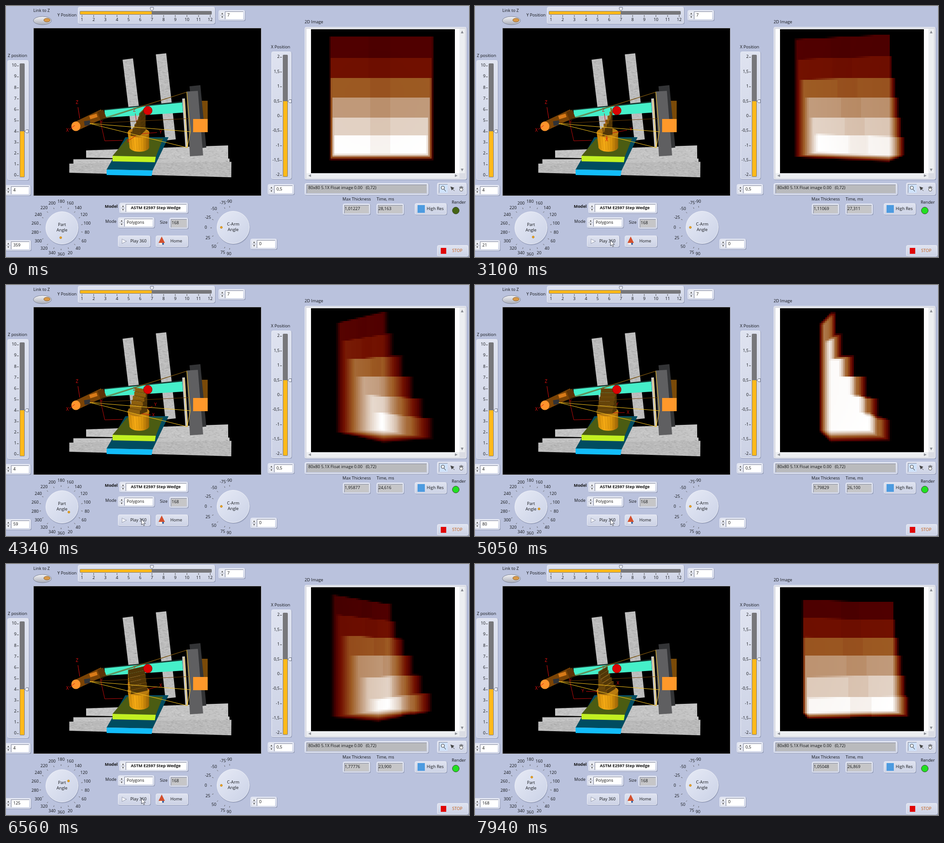
Write an HTML page with a canvas that moves like this. It is 1017 by 551 pixels and loops after 8 s.

```html
<!DOCTYPE html>
<html lang="en">
<head>
<meta charset="utf-8">
<title>X-ray stand simulator</title>
<style>
html, body { margin: 0; width: 100%; height: 100%; overflow: hidden; background: #bac2dd; }
canvas { display: block; }
</style>
</head>
<body>
<canvas id="stage" width="1017" height="551"></canvas>
<script>
const W = 1017, H = 551, LOOP = 8000;
const stage = document.getElementById('stage').getContext('2d');
let c = stage;

const sin = deg => Math.sin(deg * Math.PI / 180);
const cos = deg => Math.cos(deg * Math.PI / 180);
const comma = s => String(s).replace('.', ',');

function layer(w, h) {
  const cv = document.createElement('canvas');
  cv.width = w; cv.height = h;
  return cv.getContext('2d');
}
function seeded(s) {
  return () => (s = (s * 16807) % 2147483647) / 2147483647;
}

// ---------- drawing helpers ----------
function text(s, x, y, align = 'left', color = '#111316', style = '', size = 9.2) {
  c.font = `${style} ${size}px "Open Sans", "Noto Sans", sans-serif`;
  c.textAlign = align;
  c.textBaseline = 'middle';
  c.fillStyle = color;
  c.fillText(s, x, y);
}
function rect(x, y, w, h, color) {
  c.fillStyle = color;
  c.fillRect(x, y, w, h);
}
function trace(p) {
  c.beginPath();
  for (let i = 0; i < p.length; i += 2) c.lineTo(p[i], p[i + 1]);
}
function poly(color, ...p) {
  trace(p);
  c.fillStyle = color;
  c.fill();
}
function line(color, ...p) {
  trace(p);
  c.strokeStyle = color;
  c.lineWidth = 1;
  c.stroke();
}
function disc(x, y, rx, ry, fill, edge) {
  c.beginPath();
  c.ellipse(x, y, rx, ry, 0, 0, 7);
  c.fillStyle = fill;
  c.fill();
  if (edge) { c.strokeStyle = edge; c.lineWidth = 1; c.stroke(); }
}
function arrow(x, y, turn, size = 3, color = '#8a8d94') {
  c.save();
  c.translate(x, y);
  c.rotate(turn * Math.PI / 2);
  poly(color, 0, -size, size, size, -size, size);
  c.restore();
}
function fade(x0, y0, x1, y1, ...colors) {
  const g = c.createLinearGradient(x0, y0, x1, y1);
  colors.forEach((k, i) => g.addColorStop(i / (colors.length - 1), k));
  return g;
}
function panel(x, y, w, h, fill = fade(0, y, 0, y + h, '#dfe3f0', '#ccd2e5')) {
  c.beginPath();
  c.roundRect(x + 1, y + 1, w, h, 3);
  c.fillStyle = 'rgba(90,98,130,.45)';
  c.fill();
  c.beginPath();
  c.roundRect(x + .5, y + .5, w - 1, h - 1, 3);
  c.fillStyle = fill;
  c.fill();
  c.strokeStyle = '#eef0f8';
  c.lineWidth = 1;
  c.stroke();
}
function field(x, y, w, h, fill = '#fff') {
  rect(x, y, w, h, '#85899a');
  rect(x + 1, y + 1, w - 1, h - 1, fill);
}
function numberBox(x, y, w, value, style) {
  panel(x, y, w, 23);
  const m = y + 11.5;
  rect(x + 3, y + 3, 10, 17, '#e9ebf2');
  line('#b5b9c8', x + 3, m, x + 13, m);
  arrow(x + 8, m - 4, 0, 1.8, '#444');
  arrow(x + 8, m + 4, 2, 1.8, '#444');
  field(x + 14, y + 3, w - 18, 17);
  text(value, x + 19, m + .3, 'left', '#111', style);
}
function greyBox(x, y, w) {
  panel(x, y, w, 24);
  field(x + 3, y + 3, w - 6, 18, '#c6c6c8');
}
function button(x, y, w, label, tx, color) {
  panel(x, y, w, 25);
  text(label, tx, y + 13, 'left', color);
}

// ---------- control panel ----------
function handle(x, y, turn) {
  c.save();
  c.translate(x, y);
  c.rotate(turn * Math.PI / 2);
  const p = [-3.5, -4, 3.5, -4, 3.5, 0, 0, 4, -3.5, 0, -3.5, -4];
  poly('#eef0f7', ...p);
  line('#666c80', ...p);
  c.restore();
}
function slot(x, y, w, h) {
  c.beginPath();
  c.roundRect(x, y, w, h, 2);
  c.fillStyle = '#77777b';
  c.fill();
}
function verticalSlider(x, y, w, h, sx, level, top, bottom, count, label) {
  panel(x, y, w, h);
  slot(sx, top - 5, 11, bottom - top + 9);
  rect(sx + 1, level, 9, bottom + 3 - level, '#ffb91a');
  handle(sx + 15, level, 1);
  for (let i = 0; i < count; i++) {
    const ty = top + i * (bottom - top) / (count - 1);
    text(label(i), sx - 7, ty, 'right');
    line('#444', sx - 6, ty + .5, sx - 2, ty + .5);
  }
}
function drawSliders() {
  panel(158, 2, 301, 37);
  slot(162, 11, 290, 8);
  rect(163, 12, 157, 6, '#ffb91a');
  handle(320.5, 7, 0);
  for (let i = 0; i < 12; i++) {
    const x = 167 + i * 25.6;
    line('#444', x, 20, x, 24);
    text(i + 1, x, 31, 'center');
  }
  verticalSlider(3, 119, 47, 263, 30, 275, 131, 372, 11, i => 10 - i);
  verticalSlider(583, 100, 44, 280, 608, 209, 112, 371, 9, i => comma(2 - i / 2));
}
function knob(x, y, name) {
  disc(x + 1, y + 2, 36, 36, 'rgba(90,98,130,.35)');
  disc(x, y, 35.5, 35.5, fade(x - 30, y - 30, x + 30, y + 30, '#e4e8f4', '#cdd4e8'), '#f1f3fa');
  text(name, x, y - 6, 'center');
  text('Angle', x, y + 6, 'center');
}
// Direction is measured counterclockwise from straight down.
function dialMark(x, y, label, dir) {
  const dx = sin(dir), dy = cos(dir);
  text(label, x + 58 * dx, y + 58 * dy, 'center');
  line('#555', x + 45 * dx, y + 45 * dy, x + 48 * dx, y + 48 * dy);
}
function drawKnobs() {
  knob(123, 487, 'Part');
  for (let a = 20; a <= 360; a += 20) dialMark(121, 488, a, a);
  knob(499, 486, 'C-Arm');
  for (const v of [0, 25, 50, 75, 90])
    for (const s of v ? [-1, 1] : [1]) dialMark(497, 487, s * v, s * v * .92 - 90);
  disc(473, 486, 2.3, 2.3, '#f0a51e', '#b9841f');
}
function drawTools() {
  panel(947, 388, 65, 27);
  field(951, 391, 19, 19, '#cfe2fb');
  line('#333', 962, 402, 966, 407);
  disc(959.5, 399, 3.6, 3.6, '#f5faff', '#333');
  arrow(979, 399, -.5, 4, '#444');
  line('#444', 979, 399, 985, 406);
  for (let i = -2; i < 3; i++) line('#444', 1000 + i, 402, 1000 + i * 2, 395 + Math.abs(i));
  disc(1000, 403, 3.5, 3.5, '#fff', '#444');
}
function drawControls() {
  rect(0, 0, W, H, '#bac2dd');
  text('Link to Z', 60, 11);
  disc(80, 32, 20, 9, fade(0, 23, 0, 41, '#f4f4f6', '#a9adb9'), '#7e8496');
  disc(90, 31, 7, 4, '#d99a4a', '#8a6130');
  text('Y Position', 113, 21);
  text('Z position', 4, 110);
  text('X Position', 582, 91);
  text('2D Image', 656, 36);
  drawSliders();
  drawKnobs();
  numberBox(467, 9, 58, '7');
  numberBox(-3, 393, 57, '4');
  numberBox(-3, 514, 58, '');
  numberBox(575, 391, 58, '0,5');
  numberBox(537, 511, 58, '0');

  text('Model', 217, 441, 'left', '#111', 'bold');
  numberBox(249, 432, 151, '');
  text('ASTM E2597 Step Wedge', 329, 443.5, 'center', '#111', 'bold');
  text('Mode', 218, 474);
  numberBox(246, 464, 80, 'Polygons');
  text('Size', 338, 476);
  greyBox(359, 465, 41);
  text('168', 364, 477);

  button(246, 504, 71, 'Play 360', 273);
  arrow(260, 516.5, 1, 5.5, '#8b90a2');
  arrow(259.5, 516.5, 1, 4.2, '#f4f5fa');
  button(329, 504, 71, 'Home', 361);
  rect(337, 515, 11, 9, '#f5efe4');
  rect(343, 518, 4, 6, '#3f68a8');
  arrow(342, 513, 0, 7, '#d2502e');

  text('Max Thickness', 739, 425);
  text('Time, ms', 814, 425);
  greyBox(740, 434, 60);
  greyBox(814, 434, 60);
  button(898, 433, 70, 'High Res', 924);
  rect(904, 437, 16, 17, '#4d9be0');
  text('Render', 979, 432);
  button(947, 525, 69, 'STOP', 980, '#c65a10');
  rect(955, 531, 12, 13, '#e00606');
  panel(656, 389, 272, 26);
  field(660, 392, 264, 19, '#b9babd');
  text('80x80 5.1X Float image 0.00   (0,72)', 664, 399.5);
  drawTools();

  panel(656, 46, 356, 335, '#dadce4');
  rect(660, 50, 336, 317, '#fdfdfe');
  rect(996, 50, 12, 317, '#eceef1');
  rect(660, 367, 336, 11, '#eceef1');
  arrow(1002, 57, 0);
  arrow(1002, 360, 2);
  arrow(667, 372.5, -1);
  arrow(989, 372.5, 1);
}

// ---------- 3D scene ----------
const rnd = seeded(77);

// A straight bar between two points, as wide as w0 at its start and w1 at its end.
function bar(color, x0, y0, x1, y1, w0, w1 = w0) {
  const len = Math.hypot(x1 - x0, y1 - y0), nx = (y1 - y0) / len / 2, ny = (x0 - x1) / len / 2;
  poly(color, x0 + nx * w0, y0 + ny * w0, x1 + nx * w1, y1 + ny * w1,
    x1 - nx * w1, y1 - ny * w1, x0 - nx * w0, y0 - ny * w0);
}
function brushed(color, x0, y0, x1, y1, w0, w1 = w0) {
  bar(color, x0, y0, x1, y1, w0, w1);
  c.save();
  c.clip();
  const w = x1 - x0 + w1, h = y1 - y0 + w1;
  for (let i = w * h / 9; i > 0; i--)
    rect(x0 - w1 / 2 + rnd() * w, y0 - w1 / 2 + rnd() * h, 2 + rnd() * 4, 1,
      rnd() < .5 ? 'rgba(255,255,255,.13)' : 'rgba(95,95,95,.13)');
  c.restore();
}
// Front edge at (x, y) with width w, back edge at (bx, by) with width bw.
function plate(x, y, w, h, bx, by, bw, top, front) {
  poly(top, x, y, bx, by, bx + bw, by, x + w, y + 2);
  poly(front, x, y, x + w, y + 2, x + w - 2, y + h + 2, x, y + h);
}
function drawBackScene() {
  rect(60, 48, 501, 369, '#a0a2a8');
  rect(61, 49, 499, 367, '#000');
  brushed('#bdbdbd', 267.5, 116.5, 289, 291, 23);
  brushed('#bdbdbd', 340.5, 105, 361.5, 294, 23);
  brushed('#c4c4c4', 176, 325, 488, 322, 16, 32);
  brushed('#c4c4c4', 148, 345, 491, 341, 17, 12);
  brushed('#bababa', 139, 356, 495, 359, 20, 34);
  plate(221, 359, 101, 12, 262, 288, 95, '#004c60', '#12bdfa');
  plate(234, 329, 95, 12, 266, 291, 79, '#4b5c12', '#c2f021');

  bar('#14352f', 216, 229, 388, 211, 4);
  bar('#45efc9', 217, 237, 388, 223, 16, 22);
  bar('#7a4306', 154, 264, 213, 236, 20);
  bar('#5c3205', 204, 241, 217, 236, 18);
  bar('#d87a18', 184, 245, 200, 240, 8);
  bar('#303236', 172, 258, 185, 256, 10);
  disc(153.5, 264, 10, 10.5, '#ff942c');

  rect(428, 208, 15, 42, '#7a4a08');
  bar('#333436', 415, 175, 428, 312, 24);
  bar('#5f5f61', 409, 187, 418.5, 329, 25, 29);
  bar('#c9c9c9', 390, 203, 397, 309, 6);
  rect(411, 248, 32, 29, '#ff982a');

  line('#e01010', 158, 222, 162, 247);
  line('#e01010', 139, 271, 151, 262);
  line('#c00c0c', 207, 252, 217, 296, 256, 295);
  text('Z', 156, 212, 'center', '#e01010', '', 10);
  text('X', 135, 273, 'center', '#e01010', '', 10);
  text('Y', 210, 256, 'center', '#c00c0c', '', 9);

  const metal = fade(267, 0, 315, 0, '#c98406', '#f5aa14', '#dc960c', '#966006');
  disc(293, 310, 21.5, 10, metal);
  bar(metal, 291, 278, 293, 311, 47, 43);
  for (let i = 1; i < 8; i++) line('rgba(110,65,0,.18)', 267 + i * 6, 284, 272 + i * 5.2, 316);
  disc(291, 278, 24, 10.5, '#b97c10');
}
function drawBeams() {
  const beam = (color, x, y) => line(color, 184, 258, x, y);
  beam('#6b3f08', 397, 189);
  beam('#6b3f08', 402, 247);
  line('#7d5a10', 214, 246, 397, 189);
  beam('#ffc81e', 405, 276);
  beam('#ffc81e', 398, 311);
  line('#ffc81e', 397, 189, 405, 275, 398, 311, 391, 205);
  disc(311.5, 229.5, 9.5, 9.5, '#dc0404', '#8e0000');
}

// ---------- step wedge: width, step height, and thickness of each step ----------
const LEFT = -.91, RIGHT = .84, TOP = -1.07, RISE = .35, STEPS = [.1, .2, .4, .6, .8, 1];

// Screen offset of a ground direction on the turntable.
function axis(deg) {
  return [54 * sin(deg) - 17 * cos(deg), 17 * cos(deg) - 3 * sin(deg)];
}
function gold(k) {
  return `rgb(${235 * k},${158 * k},${22 * k})`;
}
function drawWedge(theta) {
  const ux = axis(theta), dx = axis(theta + 270), scale = 2.6, h = 8.1;
  for (const [name, v] of [['X', ux], ['Y', axis(theta + 90)]]) {
    line('#c80a0a', 290, 281, 286 + v[0] * .85, 280 + v[1] * .85);
    text(name, 286 + v[0], 280 + v[1], 'center', '#d80c0c', '', 10);
  }
  line('#c80a0a', 290, 281, 284, 236);
  text('Z', 282, 229, 'center', '#d80c0c', '', 10);

  const corners = [[1, 1], [1, 0], [0, 0], [0, 1]], azimuth = [0, 90, 180, 270];
  STEPS.slice().reverse().forEach((thick, k) => {
    const at = (i, y) => {
      const [u, d] = corners[i % 4], a = u ? RIGHT : LEFT, b = d * thick - .5;
      return [290 + (a * ux[0] + b * dx[0]) / scale, 279 + (a * ux[1] + b * dx[1]) / scale - y * h];
    };
    azimuth.forEach((turn, i) => {
      const az = theta + turn;
      if (cos(az - 17.5) <= 0) return;
      const lit = Math.max(0, cos(az - 285));
      const base = [...at(i, k), ...at(i + 1, k)];
      poly(gold(.34 + .5 * lit * lit), ...base, ...at(i + 1, k + 1), ...at(i, k + 1));
      line('rgba(40,22,0,.3)', ...base);
    });
    poly(gold(.55), ...[0, 1, 2, 3].flatMap(i => at(i, k + 1)));
  });
}

// ---------- radiograph: rays from a point source through the wedge ----------
const GRID = 80, CELL = 3.95, FOCUS = 1025, AXIS = 8.4;
const film = layer(GRID, GRID), pixels = film.createImageData(GRID, GRID);
const palette = [[0, 0, 0], [80, 0, 0], [113, 16, 0], [157, 91, 35], [193, 155, 124], [227, 211, 198], [255, 255, 255]];

function heat(v, out, i) {
  const p = Math.min(5.9999, v < .2 ? v * 10 : v * 5 + 1), k = Math.floor(p), f = p - k;
  for (let j = 0; j < 3; j++) out[i + j] = palette[k][j] * (1 - f) + palette[k + 1][j] * f;
  out[i + 3] = 255;
}
function expose(theta) {
  const co = cos(theta), si = sin(theta);
  const u0 = AXIS * si, d0 = -AXIS * co, depth = new Float32Array(GRID * GRID);
  let peak = 0;
  for (let j = 0; j < GRID; j++) for (let i = 0; i < GRID; i++) {
    const rx = (670 + (i + .5) * CELL - 828) / FOCUS, ry = (51 + (j + .5) * CELL - 205) / FOCUS + 1e-9;
    const du = rx * co - si + 1e-9, dd = rx * si + co + 1e-9;
    const chord = (ua, ub, y, da, db) => {
      const a = (ua - u0) / du, b = (ub - u0) / du, e = y / ry, f = (y + RISE) / ry, g = (da - d0) / dd, h = (db - d0) / dd;
      return Math.max(0, Math.min(Math.max(a, b), Math.max(e, f), Math.max(g, h))
        - Math.max(Math.min(a, b), Math.min(e, f), Math.min(g, h)));
    };
    let sum = 0;
    STEPS.forEach((thick, k) => {
      const y = TOP + RISE * k, face = thick - .5;
      const body = chord(LEFT, RIGHT, y, -.5, face);
      // A shallow groove runs down the middle of the steps.
      if (body) sum += body - chord(-.24, .13, y, face - thick / 20, face);
    });
    sum *= Math.hypot(rx, ry, 1);
    depth[j * GRID + i] = sum;
    peak = Math.max(peak, sum);
  }
  depth.forEach((v, i) => heat(v / peak, pixels.data, i * 4));
  film.putImageData(pixels, 0, 0);
  return peak;
}

// ---------- motion ----------
const START = 2300, TICK = 78.33, LAST = 72;

function partAngle(n) {
  return Math.round(Math.max(2 * n + 1, 2.371 * n - 2.71));
}
// Across the panel, then up onto the button.
function cursorAt(t) {
  const q = 660 + Math.floor((t - 660) / 77.5) * 77.5;
  const glide = (from, to) => Math.max(0, Math.min(1, (q - from) / (to - from)));
  const across = glide(582, 1435), up = glide(1435, 1900);
  return [883 - 583 * across - 3 * up, 542 - 7 * across - 11 * Math.sin(across * Math.PI) - 21 * up];
}
function drawCursor(x, y) {
  c.save();
  c.translate(Math.round(x) + .5, Math.round(y) + .5);
  const p = [0, 0, 0, 12, 3, 9.5, 5, 14, 7, 13, 5, 8.8, 9, 8.8, 0, 0];
  poly('#fff', ...p);
  line('#4a4e5a', ...p);
  c.restore();
}

const back = layer(W, H), live = layer(W, H);
c = back;
drawControls();
drawBackScene();

let shown = null;
function compose(n) {
  const theta = partAngle(n), peak = expose(theta), jitter = seeded(991 * (n + 3));
  jitter();
  c = live;
  c.drawImage(back.canvas, 0, 0);
  drawWedge(theta);
  drawBeams();
  c.imageSmoothingEnabled = false;
  c.drawImage(film.canvas, 670, 51, GRID * CELL, GRID * CELL);
  text((theta + 360) % 360, 16, 526);
  text(comma(peak.toFixed(5)), 744, 446);
  text(comma((22.5 + jitter() * 8).toFixed(3)), 818, 446);
  disc(120.5 + 20.5 * sin(theta), 488 + 20.5 * cos(theta), 2.3, 2.3, '#f0a51e', '#b9841f');
  disc(988, 449, 7.5, 7.5, n < 0 ? '#456414' : '#22e022', '#3c4a34');
}
function frame() {
  const t = performance.now() % LOOP;
  const n = t < START ? -1 : Math.min(LAST, Math.floor((t - START) / TICK + .01));
  if (n !== shown) compose(shown = n);
  c = stage;
  c.drawImage(live.canvas, 0, 0);
  if (t >= 280 && t < 7480) drawCursor(...cursorAt(t));
  requestAnimationFrame(frame);
}
frame();
</script>
</body>
</html>
```
